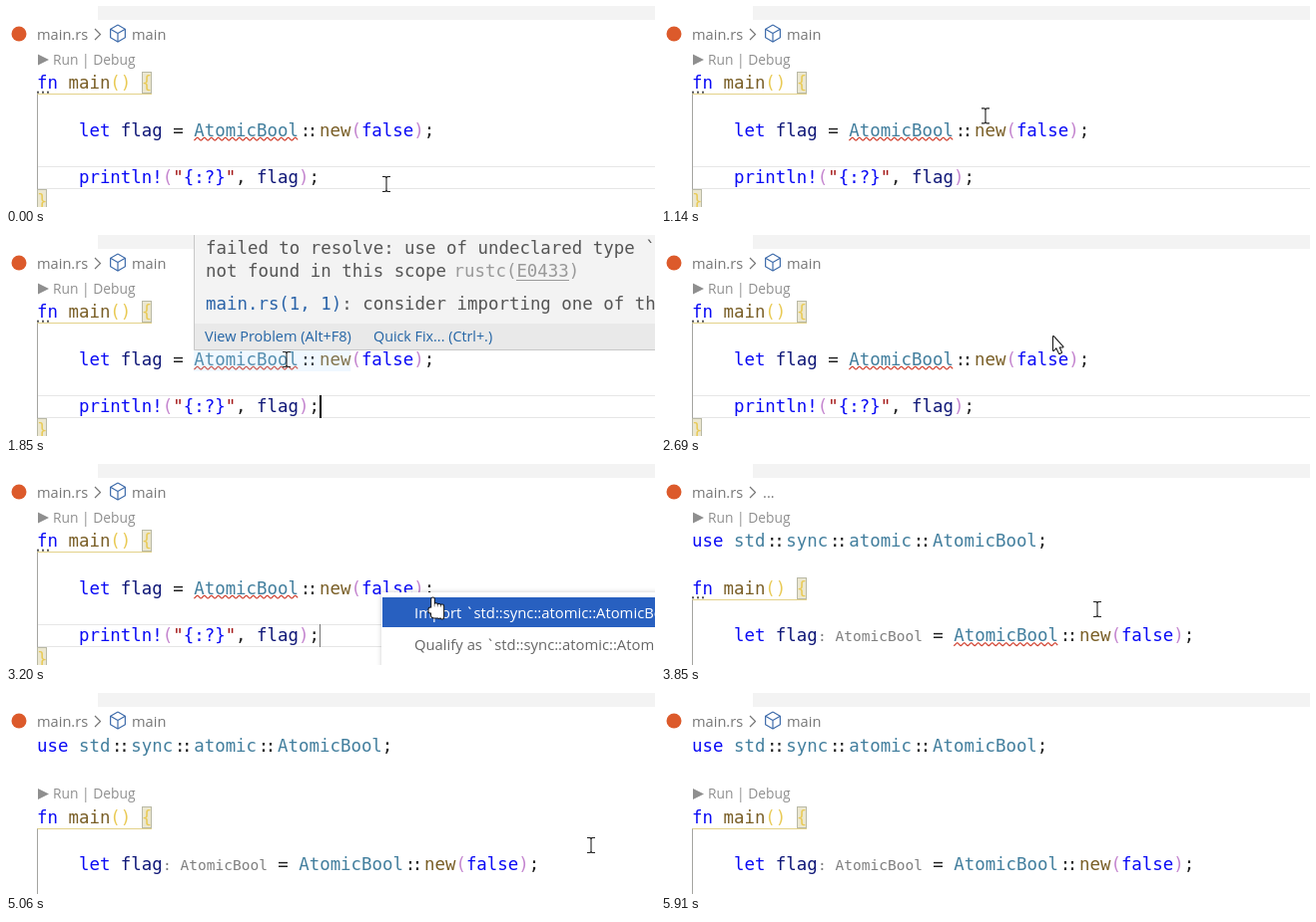
Animation, 650 px wide and 202 px high, one loop 7400 ms. Source, as an HTML page with a canvas:

```html
<!DOCTYPE html>
<html lang="en">
<head>
<meta charset="utf-8">
<style>
  html, body { margin: 0; width: 100%; height: 100%; overflow: hidden; background: #fff; }
  canvas { display: block; }
</style>
</head>
<body>
<canvas id="stage" width="650" height="202"></canvas>
<script>
const g = document.getElementById('stage').getContext('2d');
const W = 650, H = 202, LOOP = 7400, LEFT = 31, COL = 10.48, ROW = 23.8;
const MONO = '"DejaVu Sans Mono", monospace', UI = '"Open Sans", sans-serif';
const BLUE = '#0a0af5', TYPE = '#437f9e', FUNC = '#795e26', VAR = '#101878', INK = '#1e1e1e',
      GOLD = '#e9ca55', PINK = '#c485cf', QUOTE = '#a31515', GRAY = '#767676', LINK = '#2364a5',
      TEXT = '#555', FAINT = '#999', CUBE = '#3f6cab';

const CARET_ON = 400, BLINK = 500, HOVER_ON = 1750, HOVER_OFF = 2690, MENU_ON = 2790,
      MENU_OFF = 3710, IMPORTED = 3780, HINT_ON = 3850, SYMBOL_ON = 4150, SETTLED = 4250, FIXED = 4900;

// Pointer moves: each runs from the previous end point, along a curve if it has a bend
const REST = { x: 381, y: 179 };
const moves = [
  { from: 860, to: 1470, x: 281, y: 125, bend: { x: 311, y: 64 } },
  { from: 2150, to: 2550, x: 392, y: 101 },
  { from: 3000, to: 3380, x: 437, y: 146, bend: { x: 438, y: 141 } },
  { from: 4030, to: 4750, x: 567, y: 144, bend: { x: 552, y: 131 } },
  { from: 4780, to: 5060, x: 586, y: 153 },
  { from: 5600, to: 5910, x: 619, y: 212 }
];

const rowY = n => 53.4 + n * ROW;
const rect = (color, x, y, w, h) => { g.fillStyle = color; g.fillRect(x, y, w, h); };

function stroke(color, width, ...points) {
  g.strokeStyle = color;
  g.lineWidth = width;
  g.beginPath();
  points.forEach(([x, y]) => g.lineTo(x, y));
  g.stroke();
}

function label(text, x, y, size, color) {
  g.font = `${size}px ${UI}`;
  g.fillStyle = color;
  g.fillText(text, x, y);
}

// Alternating colors and texts on a fixed grid; the two colons of :: sit closer together
function code(x, y, parts, col = COL) {
  g.font = `${col / 0.602}px ${MONO}`;
  for (let i = 0; i < parts.length; i += 2) {
    const text = parts[i + 1];
    g.fillStyle = parts[i];
    for (let k = 0; k < text.length; k++, x += col) {
      const pull = text.startsWith('::', k) ? 1.7 : text.startsWith('::', k - 1) ? -1.7 : 0;
      g.fillText(text[k], x + pull, y);
    }
  }
}

function squiggle(x, y, width) {
  const points = [];
  for (let d = 0; d <= width; d++) points.push([x + d, y + 1.4 * Math.cos(d * Math.PI / 3.5)]);
  stroke('#d0402f', 1.2, ...points);
}

function braceBox(x, y) {
  rect('#b9b9a5', x, y - 11, 10, 22);
  rect('#ebe7d0', x + 1, y - 10, 8, 20);
}

function cube(x, y, r) {
  const corner = i => [x + r * Math.sin(i * Math.PI / 3), y - r * Math.cos(i * Math.PI / 3)];
  stroke(CUBE, 1.2, ...[0, 1, 2, 3, 4, 5, 6].map(corner));
  for (const i of [1, 3, 5]) stroke(CUBE, 1.2, [x, y], corner(i));
}

function header(symbol) {
  rect('#f3f3f3', 92, 0, W - 92, 14);
  g.fillStyle = '#dc5a2b';
  g.beginPath();
  g.arc(13, 28, 7.5, 0, 7);
  g.fill();
  label('main.rs', LEFT, 33.5, 14.6, GRAY);
  stroke(GRAY, 1.2, [89, 23], [94.5, 28.5], [89, 34]);
  if (symbol) cube(112, 27.5, 8.5);
  label(symbol ? 'main' : '...', symbol ? 126 : 102, 33.5, 14.6, GRAY);
}

function lens(row) {
  const y = rowY(row);
  label('Run | Debug', 47, y + 5.4, 13.8, '#8f8f8f');
  g.beginPath();
  g.moveTo(32, y - 5);
  g.lineTo(43, y + .5);
  g.lineTo(32, y + 6);
  g.fill();
}

function mainLine(row, dots) {
  const y = rowY(row), rule = Math.round(y + 11) + .5;
  braceBox(136, Math.round(y));
  code(LEFT, y + 6, [BLUE, 'fn ', FUNC, 'main', GOLD, '() {']);
  stroke('#e3d28a', 1, [LEFT, rule], [146, rule]);
  stroke('#a5a5a0', 1, [31.5, rule], [31.5, H]);
  if (dots) for (let i = 0; i < 3; i++) rect(TEXT, LEFT + i * 5, y + 8.5, 2, 2);
}

function letLine(row, hint, error) {
  const y = rowY(row) + 6, x = LEFT + 12 * COL + (hint ? 105 : 0);
  code(LEFT + 4 * COL, y, [BLUE, 'let ', VAR, 'flag']);
  if (hint) code(157, y, ['#7f7f7f', ': AtomicBool'], 8.75);
  code(x, y, [INK, ' = ', TYPE, 'AtomicBool', INK, '::', FUNC, 'new',
    PINK, '(', BLUE, 'false', PINK, ')', INK, ';']);
  if (error) squiggle(x + 3 * COL, y + 2.8, 10 * COL);
}

function printLine(row) {
  for (const y of [161.5, 183.5]) stroke('#e6e6e6', 1, [32, y], [W, y]);
  code(LEFT + 4 * COL, rowY(row) + 6, [BLUE, 'println!', PINK, '(', QUOTE, '"', BLUE, '{:?}',
    QUOTE, '"', INK, ', ', VAR, 'flag', PINK, ')', INK, ';']);
}

function hover(alpha) {
  g.globalAlpha = alpha;
  rect('rgba(173,214,255,.18)', 188, 114, 15 * COL, 23);
  rect('#f3f3f3', 188, 0, W, 116);
  rect('#e9e9e9', 188, 89, W, 27);
  stroke('#c8c8c8', 1, [188.5, 0], [188.5, 115.5], [W, 115.5]);
  code(200, 18.5, [TEXT, 'failed to resolve: use of undeclared type `']);
  code(200, 42, [TEXT, 'not found in this scope']);
  code(448.5, 42, [FAINT, 'rustc(E0433)']);
  stroke(FAINT, 1, [511, 45.5], [564, 45.5]);
  code(200, 75, ['#2a63a8', 'main.rs(1, 1)', TEXT, ': consider importing one of th']);
  label('View Problem (Alt+F8)', 199, 107, 14.5, LINK);
  label('Quick Fix... (Ctrl+.)', 368, 107, 14.3, LINK);
  g.globalAlpha = 1;
}

function menu() {
  g.save();
  g.shadowColor = 'rgba(0,0,0,.2)';
  g.shadowBlur = 5;
  rect('#fff', 376, 129, W, H);
  g.restore();
  rect('#2860c0', 377, 134, W, 30);
  label('Import `std::sync::atomic::AtomicBool`', 409, 155, 14.8, '#fff');
  label('Qualify as `std::sync::atomic::AtomicBool`', 409, 186.5, 14.8, '#666');
}

function iBeam(x, y) {
  stroke('#222', 1.1, [x, y - 7], [x, y + 7]);
  for (const end of [-7.5, 7.5])
    stroke('#222', 1.1, [x - 4, y + end], [x - 1, y + end], [x, y + end * .87],
      [x + 1, y + end], [x + 4, y + end]);
}

// White shape with a thin dark outline
function outlined(path) {
  g.strokeStyle = '#111';
  g.lineWidth = 2;
  g.lineJoin = 'round';
  g.stroke(path);
  g.fillStyle = '#fff';
  g.fill(path);
}

function arrow(x, y) {
  const path = new Path2D('M1 1V15L4 12L7 18L9 17L6.5 11.5H10.5Z');
  g.save();
  g.translate(x, y);
  outlined(path);
  g.restore();
}

function hand(x, y) {
  const path = new Path2D();
  for (let i = 0; i < 4; i++) path.roundRect(x - 1.3 + i * 3.1, y + (i ? 6 + i * .7 : 1), 2.6, 14, 1.3);
  path.roundRect(x - 4, y + 11, 3.5, 5, 1.5);
  path.roundRect(x - 1.5, y + 10, 12, 11, 3);
  outlined(path);
}

function pointerAt(t) {
  let at = REST;
  for (const m of moves) {
    if (t < m.from) break;
    const f = Math.min(1, (t - m.from) / (m.to - m.from));
    const bend = m.bend || { x: (at.x + m.x) / 2, y: (at.y + m.y) / 2 };
    const curve = k => at[k] * (1 - f) ** 2 + 2 * bend[k] * f * (1 - f) + m[k] * f ** 2;
    at = { x: curve('x'), y: curve('y') };
  }
  return at;
}

function pointer(t) {
  const { x, y } = pointerAt(t);
  const overHover = t > HOVER_ON && t < HOVER_OFF && y < 116;
  const overMenu = t >= HOVER_OFF && t < MENU_OFF;
  if (overHover && x > 366 || overMenu && y > 128) hand(x, y);
  else if (overHover || overMenu) arrow(x, y);
  else iBeam(x, y);
}

function caret(t) {
  if (t >= MENU_ON && t < MENU_OFF) rect(GRAY, 314, 161, 1, 23);
  else if (t >= CARET_ON && t < HOVER_OFF && (t - CARET_ON) % (2 * BLINK) < BLINK)
    rect('#000', 314, 161, 2, 23);
}

function drawBefore(t) {
  header(true);
  lens(0);
  mainLine(1, true);
  letLine(3, false, true);
  printLine(5);
  braceBox(LEFT, 195);
  code(LEFT, rowY(6) + 6, [GOLD, '}']);
  caret(t);
  if (t >= HOVER_ON && t < HOVER_OFF) hover(Math.min(1, (t - HOVER_ON + 40) / 140));
  if (t >= MENU_ON && t < MENU_OFF) menu();
}

function drawAfter(t) {
  const settled = t >= SETTLED, error = t < FIXED;
  header(t >= SYMBOL_ON);
  lens(settled ? 2 : 0);
  code(LEFT, rowY(settled ? 0 : 1) + 6, [BLUE, 'use ', TYPE, 'std', INK, '::', TYPE, 'sync',
    INK, '::', TYPE, 'atomic', INK, '::', TYPE, 'AtomicBool', INK, ';']);
  mainLine(3, error);
  letLine(5, t >= HINT_ON, error);
}

const start = performance.now();
function frame() {
  const t = (performance.now() - start) % LOOP;
  rect('#fff', 0, 0, W, H);
  (t < IMPORTED ? drawBefore : drawAfter)(t);
  pointer(t);
  requestAnimationFrame(frame);
}
frame();
</script>
</body>
</html>
```
